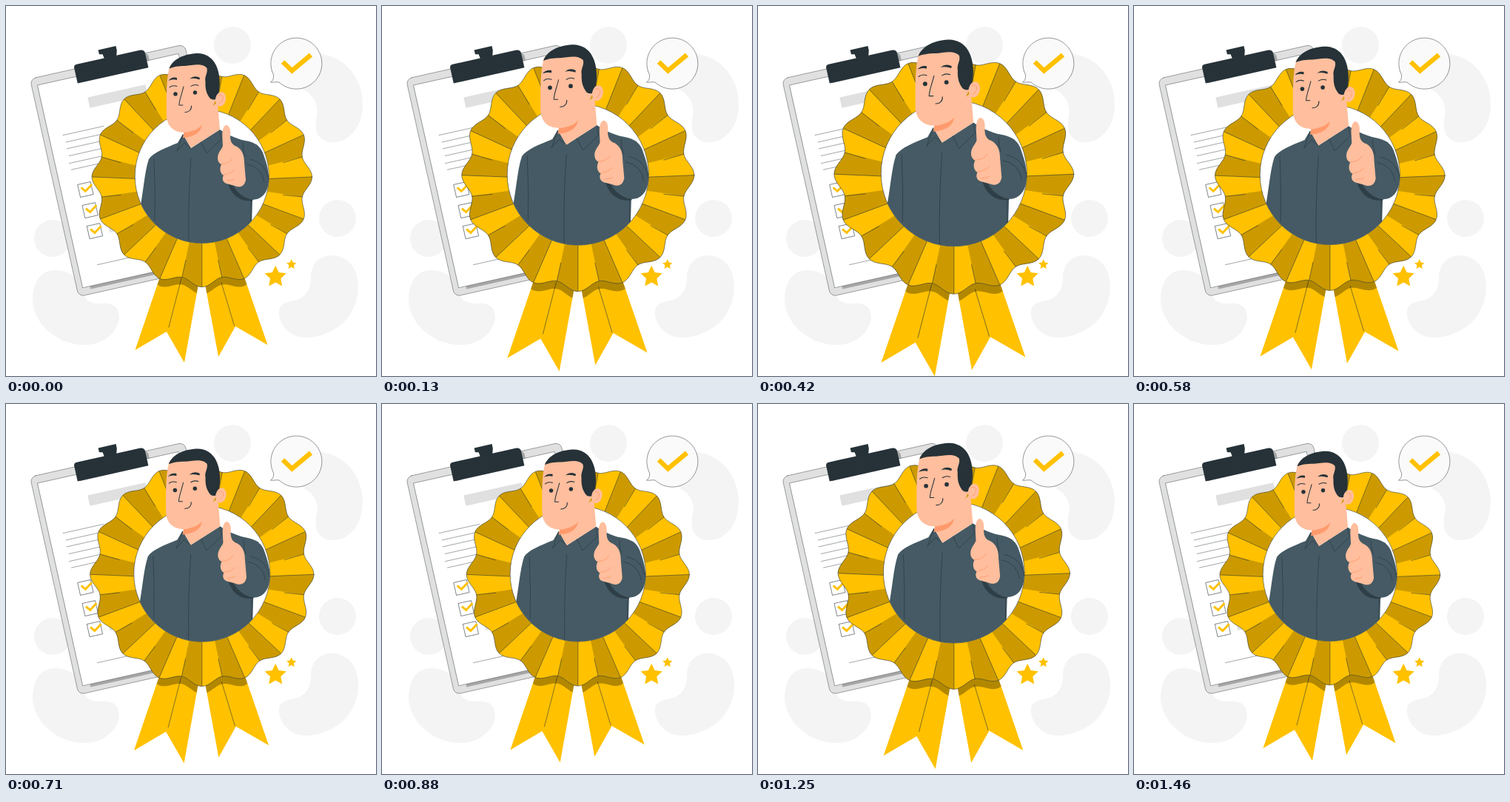
These frames come from a looping animation (500 px wide and 500 px high, 1.5 s). An HTML page:

```html
<!DOCTYPE html>
<html lang="en">
<head>
<meta charset="utf-8">
<title>Approved badge</title>
<style>
html, body { margin: 0; width: 100%; height: 100%; overflow: hidden; background: #fff; }
svg { display: block; width: 100%; height: 100%; }
.gold { fill: #ffc100; }
.dark { fill: #263238; }
.skin { fill: #ffbe9d; }
.shirt { fill: #455a64; }
.line { fill: none; stroke: #263238; stroke-width: .55; stroke-linecap: round; stroke-linejoin: round; }
.thin .line { stroke-width: .4; }
.tick { fill: none; stroke: #ffc100; }
.fold { fill: none; stroke: #ff9a6c; stroke-width: .8; }
</style>
</head>
<body>
<svg viewBox="0 0 500 500">
  <defs>
    <path id="scallop"/>
    <path id="tails" d="M209.500 362L174.500 465 217 440 241 482 262.500 362ZM266.500 362L287 474 310 433 353.500 458 320.500 362Z"/>
    <clipPath id="inTails"><use href="#tails"/></clipPath>
    <clipPath id="inRing"><path d="M174.300 230A90.500 90.500 0 0 0 355.300 230V50H174.300Z"/></clipPath>
    <g id="item">
      <rect width="17.500" height="17.500" class="line"/>
      <path class="tick" stroke-width="3" d="M3.500 5L8 11 18.500 4"/>
      <rect x="28" y="3" width="80" height="12" fill="#e0e0e0"/>
    </g>
  </defs>

  <g fill="#f4f4f4">
    <circle cx="306" cy="53" r="25"/>
    <circle cx="448" cy="287" r="25"/>
    <circle cx="63" cy="314" r="25"/>
    <path d="M405 67C448 56 482 92 482 132C482 165 462 185 441 184C420 183 416 167 420 148C423 132 415 120 400 112Z"/>
    <path d="M440 337C465 337 477 358 476 382C475 422 440 448 405 448C385 448 369 432 369 414C369 400 383 400 393 397C408 392 412 380 412 366C412 348 424 337 440 337Z"/>
    <path d="M66 357C46 357 36 375 36 397C37 432 72 458 106 458C135 458 153 437 153 420C152 404 142 401 127 402C110 403 105 393 102 381C97 365 83 357 66 357Z"/>
  </g>

  <g class="thin" transform="translate(32.400 98.500) rotate(-12.600)">
    <rect width="214" height="301.500" rx="8" fill="#e0e0e0"/>
    <rect width="214" height="301.500" rx="8" class="line"/>
    <path fill="#a6a6a6" d="M18 290H200V295H18ZM158 -3L163 4V12H158Z"/>
    <rect x="8.300" y="10.500" width="195" height="280.500" fill="#fff"/>
    <rect x="8.300" y="10.500" width="195" height="280.500" class="line"/>
    <path class="dark" d="M61.500 20V-1Q61.500 -5.500 66 -5.500H104L103 -11 98.500 -12V-18H123V-12L121 -5.500H153Q159 -5.500 159.500 0V20Z"/>
    <rect x="70.500" y="41.500" width="80" height="14.500" fill="#e0e0e0"/>
    <path class="line" d="M27 84H83M29 94H190M28 103H190M29 113H190M27 123H190M28 132H190M34 265H150"/>
    <use href="#item" x="32" y="153.500"/>
    <use href="#item" x="32" y="182.300"/>
    <use href="#item" x="32" y="211"/>
  </g>

  <path class="gold" id="stars"/>

  <g id="badge">
    <use href="#tails" class="gold"/>
    <path class="line" d="M237 368L220 434M291 374L308.500 432"/>
    <g clip-path="url(#inTails)"><use href="#scallop" y="10" fill="#000" opacity=".3"/></g>

    <use href="#scallop" class="gold"/>
    <path id="pleats" fill="#cc9a00"/>
    <path id="creases" class="line"/>
    <use href="#scallop" class="line"/>
    <circle cx="264.800" cy="230" r="90.500" fill="#fff"/>
    <circle cx="264.800" cy="230" r="90.500" class="line"/>

    <g clip-path="url(#inRing)">
      <path class="shirt" d="M239 173L232 185C215 192 199 198 193 207C187 225 186 250 180 280V330H331L333 262L340 188C325 182 305 179 289 167L250 192Z"/>
      <path fill="#2f3f47" d="M300 240C304 254 315 265 333 263L336 258 308 242Z"/>
      <path class="shirt" d="M318 181C334 183 343 188 347 198C352 212 356 224 355 238C353 255 343 263 331 261.500C321 259 312 252 307 243L320 225Z"/>
      <path class="line" d="M250 205Q246 260 247 318M200 207Q202 250 201 290M331 262L331 292M239 174L231 196 241 185 250 192M263 183L271 199 291 180 289 168M320 185Q320 195 323 203M355 235Q352 212 330 207M349 238Q346 218 326 214"/>
    </g>

    <path class="skin" d="M240 165L240 175 250 192 289 167 286 130Z"/>
    <path fill="#ff9a6c" d="M239 178L241 169C252 170 260 167 265 160C264 171 254 177 239 178Z"/>
    <path class="skin" d="M222 80C216 96 217 126 217 150C219 167 232 172 245 170.500C262 167 273 156 278 138L286 122 276 76 250 70Z"/>
    <path class="dark" d="M220.500 84.500C226 70 244 64 260 64C276 65 284 76 287 89C290 102 289 116 285 125Q281 128 276 125C271 119 269 112 269.500 102C268 95 273 91 271.500 84C264 76 251 81 242 81C233 81 227 82 220.500 84.500Z"/>
    <ellipse class="skin" cx="290" cy="126" rx="7" ry="10" transform="rotate(12 290 126)"/>
    <path class="fold" d="M287 121Q294 119 293 126Q291 131 288 132"/>
    <circle class="dark" cx="229" cy="119" r="2.700"/>
    <circle class="dark" cx="255.500" cy="117" r="2.700"/>
    <path class="dark" d="M219.500 101Q224 95.500 231 97L231 100Q225 98.500 219.500 101ZM248 98.500Q255 93 262 97L261.500 99.500Q255 97 248 98.500Z"/>
    <path class="line" style="stroke-width:1" d="M221 110Q225 106.500 231 108.500M250 108.500Q255 105.500 260 107.500M240 109C238 118 234 127 234 134L239 134M242 143.500C247 144 251 140 250.500 135"/>

    <path class="skin" d="M297 161C302 161 304 167 303 176C303 184 306 188 312 190C320 195 322 203 322 212L324 235C322 246 314 245 309 243L298 240C292 238 292 232 294 229C288 225 289 218 291 214C285 211 285 203 288 198C290 194 293 191 293 188C293 180 290 165 297 161Z"/>
    <path class="fold" d="M291 213.500Q302 213 306 206M294 228Q304 227 309 221M298 236Q304 236 309 234"/>
  </g>

  <path fill="#fafafa" stroke="#263238" stroke-width=".5" d="M361.500 93A34.500 34.500 0 1 1 369 103C365 102 361 104 357.500 103C361 101 362 97 361.500 93Z"/>
  <path class="tick" stroke-width="6.500" d="M374 75.500L386.500 87.500 412 66"/>
</svg>
<script>
const $ = id => document.getElementById(id);
const CX = 264.8, CY = 231, PLEATS = 16;
const polar = (r, a, x = CX, y = CY) =>
  `${(x + r * Math.cos(a)).toFixed(2)} ${(y + r * Math.sin(a)).toFixed(2)}`;
const rim = a => 143.4 + 5.3 * Math.cos(PLEATS * a);
const arc = (from, to, n) =>
  Array.from({ length: n + 1 }, (_, i) => from + (to - from) * i / n).map(a => polar(rim(a), a));

function drawRosette() {
  // Pleats converge slightly below the centre
  const inner = (r, a) => polar(r, a, CX, CY + 2.5);
  let pleats = '', creases = '';
  for (let i = 0; i < PLEATS; i++) {
    const peak = i * 2 * Math.PI / PLEATS, valley = peak + Math.PI / PLEATS;
    pleats += `M${inner(86, peak)}L${arc(peak, valley, 8).join(' ')} ${inner(86, valley)}Z`;
    creases += `M${inner(88, peak)}L${polar(148, peak)}M${inner(112, valley)}L${polar(138, valley)}`;
  }
  $('scallop').setAttribute('d', `M${arc(0, 2 * Math.PI, 256).join('L')}Z`);
  $('pleats').setAttribute('d', pleats);
  $('creases').setAttribute('d', creases);
}

function star(x, y, r) {
  const points = Array.from({ length: 10 }, (_, i) =>
    polar(i % 2 ? r * .49 : r, (i / 5 - .5) * Math.PI, x, y));
  return `M${points.join('L')}Z`;
}

// Each beat: start, end, value from, value to, ease-out power
const LOOP = 1500;
const BEATS = [
  [0, 386, 0, 1, 2],
  [386, 855, 1, 0, 1.5],
  [855, 1160, 0, 1, 1.5],
  [1160, LOOP, 1, 0, 2]
];

function pulse(t) {
  const [start, end, from, to, power] = BEATS.find(b => t < b[1]);
  return to + (from - to) * (1 - (t - start) / (end - start)) ** power;
}

function frame() {
  const scale = 1 + .1 * pulse(performance.now() % LOOP);
  $('badge').setAttribute('transform', `translate(${CX} 273) scale(${scale}) translate(${-CX} -273)`);
  requestAnimationFrame(frame);
}

drawRosette();
$('stars').setAttribute('d', star(364.2, 366, 15.3) + star(385.7, 349.3, 7));
frame();
</script>
</body>
</html>
```
